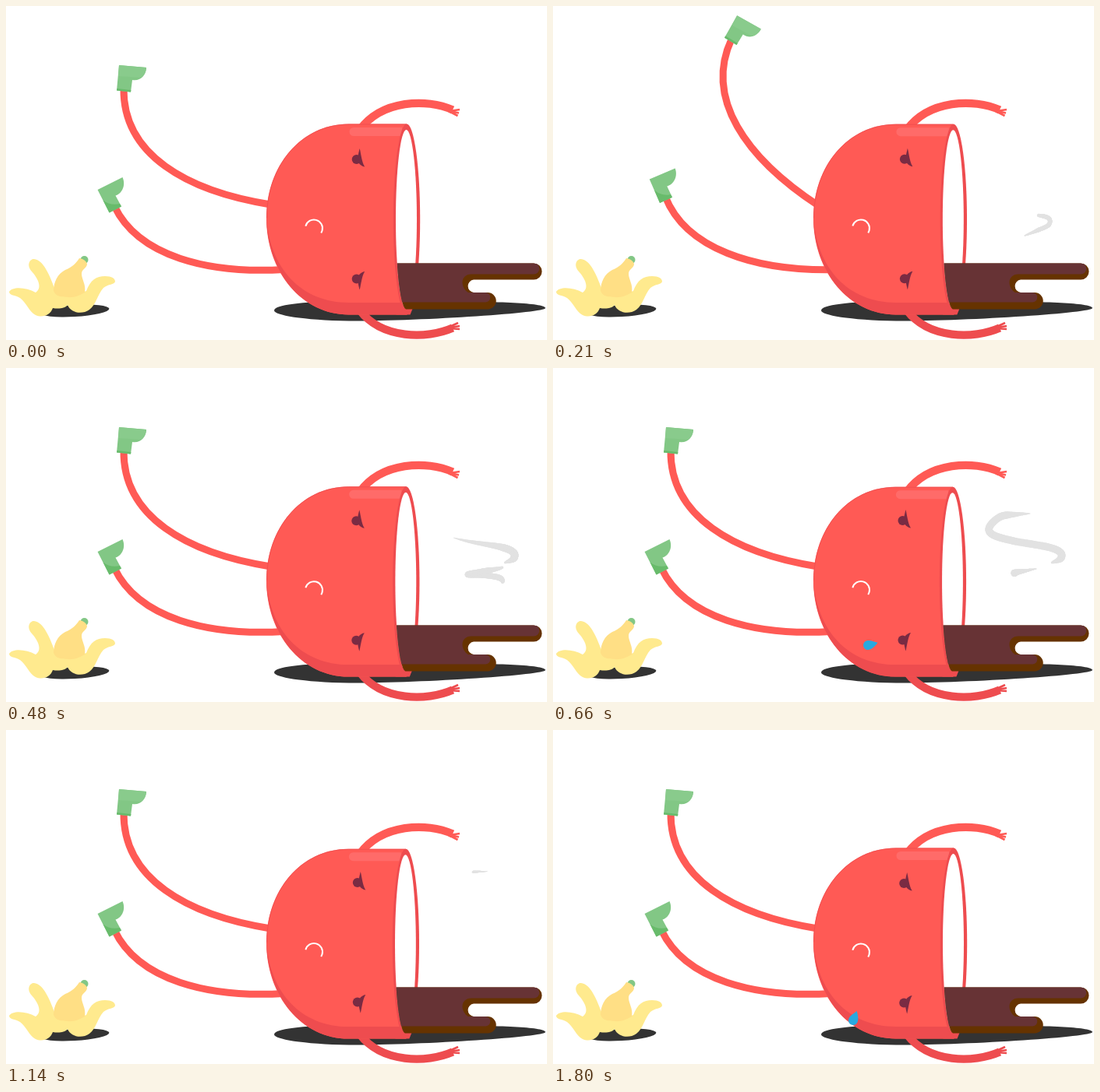
Animation, 694 px wide and 429 px high, one loop 1.83 s. Source, as an HTML page with a canvas:

```html
<!DOCTYPE html>
<html lang="en">
<head>
<meta charset="utf-8">
<title>Spilled cup</title>
<style>
html, body { margin: 0; width: 100%; height: 100%; overflow: hidden; background: #fff; }
canvas { display: block; }
</style>
</head>
<body>
<canvas id="stage" width="694" height="429"></canvas>
<script>
const ctx = document.getElementById('stage').getContext('2d');
const LOOP = 1830, STEP = 30;
const RED = '#ff5a55', DEEP = '#ee4c4f', INK = '#333', PLUM = '#7a2b43';
const GREEN = '#82c785', LEAF = '#68bb6b', STEAM = '#e2e2e2';

const clamp = (v) => Math.max(0, Math.min(1, v));
const lerp = (a, b, p) => a + (b - a) * p;
const span = (t, a, b) => clamp((t - a) / (b - a));
const smooth = (p) => p * p * (3 - 2 * p);

function fill(d, color) {
  ctx.fillStyle = color;
  ctx.fill(new Path2D(d));
}

function line(d, color, width) {
  ctx.strokeStyle = color;
  ctx.lineWidth = width;
  ctx.lineCap = 'butt';
  ctx.stroke(new Path2D(d));
}

function oval(x, y, rx, ry, color, turn = 0) {
  ctx.fillStyle = color;
  ctx.beginPath();
  ctx.ellipse(x, y, rx, ry, turn, 0, Math.PI * 2);
  ctx.fill();
}

function group(draw) {
  ctx.save();
  draw();
  ctx.restore();
}

function rotateAt(x, y, deg) {
  ctx.translate(x, y);
  ctx.rotate(deg * Math.PI / 180);
  ctx.translate(-x, -y);
}

function peel() {
  oval(88, 391.5, 44.5, 7.5, INK, -0.06);
  fill('M4 367C8 360 26 361 38 368C46 363 43 352 33 341C26 333 30 325 36 325C48 326 56 346 62 362L80 374L103 366C108 352 116 347 127 347C136 347 140 350 140 354C139 358 131 357 125 362C117 371 116 383 107 390C97 397 83 394 79 384C75 389 67 389 60 388C57 397 47 401 38 397C29 392 27 382 18 375C12 371 4 372 4 367Z', '#ffea8e');
  oval(100.5, 326, 5, 5, GREEN);
  fill('M61 366C61 355 66 344 76 339C86 335 90 330 94 324C98 324 104 328 104 332C103 337 97 338 97 344C97 351 103 358 101 368C94 372 86 375 80 374C73 373 65 375 61 366Z', '#ffdf85');
}

function upperLeg(swing) {
  group(() => {
    rotateAt(338, 255, 28 * swing);
    line('M342 255.5C230 238 150 190 151 106', RED, 9);
    fill('M145 76L180 79C180 89 172 97 162 95L160 110.5L142 108.5Z', GREEN);
    fill('M145 76L180 79C180 84 177 90 173 92L144 90Z', '#89cb8c');
    fill('M142.4 106L160.4 108L160 110.5L142 108.5Z', LEAF);
  });
}

function lowerLeg(swing) {
  group(() => {
    rotateAt(351, 337, 31 * swing);
    // the knee sags while the leg is up
    const sag = 9 * swing, back = 4 * swing;
    line(`M356 338.5C${260 - back} ${344 + sag} ${170 - back} ${322 + sag} 139 257`, RED, 9);
    fill('M117.5 236L149.5 220C154 230 149 241 140.5 243.5L148 257.5L132.5 265.5Z', GREEN);
    fill('M124.5 249.5C130 254 138 256 146 254L148 257.5L132.5 265.5Z', LEAF);
  });
}

function arms() {
  line('M454 159C482 120.5 540 118.5 573 133.5', RED, 10.3);
  line('M569 135L582 133M570 135L581 137.5M568 135L579.5 141', RED, 2.6);
  line('M454 391C482 428 540 428 573 413.5', DEEP, 10.3);
  line('M569 412L580 407M570 413L582 411M568 414L582 415', DEEP, 2.6);
}

function cup(k) {
  group(() => {
    ctx.translate(334, 396);
    ctx.scale(1 - 0.007 * k, 1 - 0.006 * k);
    ctx.translate(-334, -396);
    fill('M440 151.5H514V396.5H440C380 396.5 334 342 334 272C334 206 378 151.5 440 151.5Z', RED);
    fill('M334 268C337 338 380 381 440 381H514V396.5H440C380 396.5 334 342 334 268Z', DEEP);
    line('M334.6 272C334.6 206 378 152 440 152H514', DEEP, 0.8);
    fill('M446 156H508V167H446A5.5 5.5 0 0 1 446 156Z', '#ff6b69');
    oval(514, 274, 17.2, 122.5, DEEP);
    oval(513.5, 274, 13.5, 115, '#fff');
    fill('M513 389H521.5L518.5 396.5H500Z', DEEP);
  });
}

function coffee(k) {
  const edge = 501.8 - 1.4 * k, foot = 513 - 1.4 * k;
  const pool = new Path2D(`M${edge} 330.5H677A10.3 10.3 0 0 1 677 351.5H600A8.3 8.3 0 0 0 600 368H618A10.7 10.7 0 0 1 618 389.5H${foot}A13.5 115 0 0 1 ${edge} 330.5Z`);
  group(() => {
    ctx.clip(pool);
    ctx.fillStyle = '#663300';
    ctx.fillRect(490, 325, 204, 70);
    fill('M490 330H677A7 7 0 0 1 677 344.5H597C583 344.5 582 361 593 368H615A6 6 0 0 1 615 380.5H490Z', '#673335');
  });
}

function eye(x, y, flip, shut) {
  group(() => {
    ctx.translate(x, y);
    ctx.scale(1, flip);
    if (shut > 0.5) {
      fill('M3.5 -14C0 -4 2 8 10.5 9.5C6 3 4.5 -4 3.5 -14Z', PLUM);
    } else {
      fill('M4 -14C2 -6 -2 7 10.5 9.5C6.5 3 6 -6 4 -14Z', PLUM);
      oval(0, 0, 6, 6 * (1 - shut), PLUM);
    }
  });
}

function face(t, k) {
  const dx = 1.2 * Math.sin(t / 870 * Math.PI * 2) - 0.3;
  const dy = -1.2 * k;
  const shut = clamp(2 - Math.abs(t - 300) / 45);
  eye(450 + dx, 197 + dy, 1, shut);
  eye(450 + dx, 350.5 + dy, -1, shut);
  const rad = Math.PI / 180;
  ctx.strokeStyle = '#fff';
  ctx.lineWidth = 2;
  ctx.beginPath();
  ctx.arc(395, 285.5 + dy / 2, 11, 195 * rad, 393 * rad);
  ctx.stroke();
}

function tear(age) {
  if (age <= 0 || age >= 450) return;
  const grow = span(age, 0, 90), roll = span(age, 90, 360), drop = span(age, 360, 450);
  const x = lerp(412, 404, grow) - 19 * roll - 4 * drop;
  const y = lerp(354, 356, grow) + 17 * roll * lerp(0.7, 1, roll) + 22 * drop * drop;
  group(() => {
    ctx.translate(x, y);
    ctx.rotate(lerp(-0.25, -1.2, roll) - 0.37 * drop);
    const size = grow * (1 - span(drop, 0.6, 1));
    ctx.scale(size, size);
    fill('M13 0C9 -2 5 -6 0 -6A6 6 0 0 0 0 6C5 6 9 3 13 0Z', '#28a9e0');
  });
}

// Catmull-Rom point on a list, p from 0 to 1
function along(pts, p) {
  const n = pts.length - 1;
  const i = Math.min(n - 1, Math.floor(p * n)), f = p * n - i;
  const at = (j) => pts[Math.max(0, Math.min(n, j))];
  return [0, 1].map((c) => {
    const [a, b, d, e] = [at(i - 1)[c], at(i)[c], at(i + 1)[c], at(i + 2)[c]];
    return b + 0.5 * f * (d - a + f * (2 * a - 5 * b + 4 * d - e + f * (3 * (b - d) + e - a)));
  });
}

// A tapered stroke over the part of the curve between lo and hi
function wisp(pts, lo, hi, width, tail, head) {
  if (hi - lo < 0.01) return;
  const n = 90;
  ctx.strokeStyle = STEAM;
  ctx.lineCap = 'round';
  let prev = along(pts, lo);
  for (let i = 1; i <= n; i++) {
    const p = lerp(lo, hi, i / n), next = along(pts, p);
    const thick = Math.min(1, tail + (p - lo) * 6, head + (hi - p) * 5);
    ctx.lineWidth = Math.max(0.8, width * thick);
    ctx.beginPath();
    ctx.moveTo(...prev);
    ctx.lineTo(...next);
    ctx.stroke();
    prev = next;
  }
}

const LOW = [[605, 295], [622, 288], [636, 281], [635, 272], [615, 268], [593, 267], [612, 263], [634, 259], [645, 254]];
const HIGH = [[640, 250], [651, 245], [651, 237], [635, 230], [590, 222], [564, 214], [560, 204], [574, 191], [594, 188], [612, 187]];

function steam(t) {
  const fade = span(t, 300, 660), gone = span(t, 660, 780);
  group(() => {
    ctx.translate(-fade, -3.5 * fade);
    const lo = lerp(0, 0.625, fade), hi = lerp(1, 0.8, fade) * smooth(span(t, 130, 300));
    wisp(LOW, lerp(lo, 0.69, gone), lerp(hi, 0.69, gone), lerp(5.5, 9.5, fade), 0.2 + 0.8 * fade, lerp(0.8, 0.1, fade));
  });
  const rise = span(t, 660, 1140);
  group(() => {
    ctx.translate(5 * rise, -5.5 * rise);
    const lo = 0.89 * smooth(rise) + 0.11 * span(t, 1140, 1230);
    wisp(HIGH, lo, smooth(span(t, 300, 660)), lerp(9.5, 5, rise), lerp(0.2, 0.9, rise), 0.1);
  });
}

// One raised-cosine swing
const kick = (t, start) => (1 - Math.cos(span(t, start, start + 235) * Math.PI * 2)) / 2;

function scene(t) {
  const k = Math.sin(t / LOOP * Math.PI) ** 2;
  ctx.fillStyle = '#fff';
  ctx.fillRect(0, 0, 694, 429);
  peel();
  fill('M344 391C344 384 380 379.5 430 379.5H560C640 379.5 692 382 692 388C692 394 540 404.5 440 404.5C380 403.5 344 397 344 391Z', INK);
  arms();
  lowerLeg(kick(t, 0));
  upperLeg(kick(t, 65));
  cup(k);
  coffee(k);
  face(t, k);
  tear(t - 570);
  tear(t - 1440);
  steam(t);
}

let begin = null;
function tick(now) {
  if (begin === null) begin = now;
  scene(Math.floor((now - begin) % LOOP / STEP) * STEP);
  requestAnimationFrame(tick);
}
scene(0);
requestAnimationFrame(tick);
</script>
</body>
</html>
```
